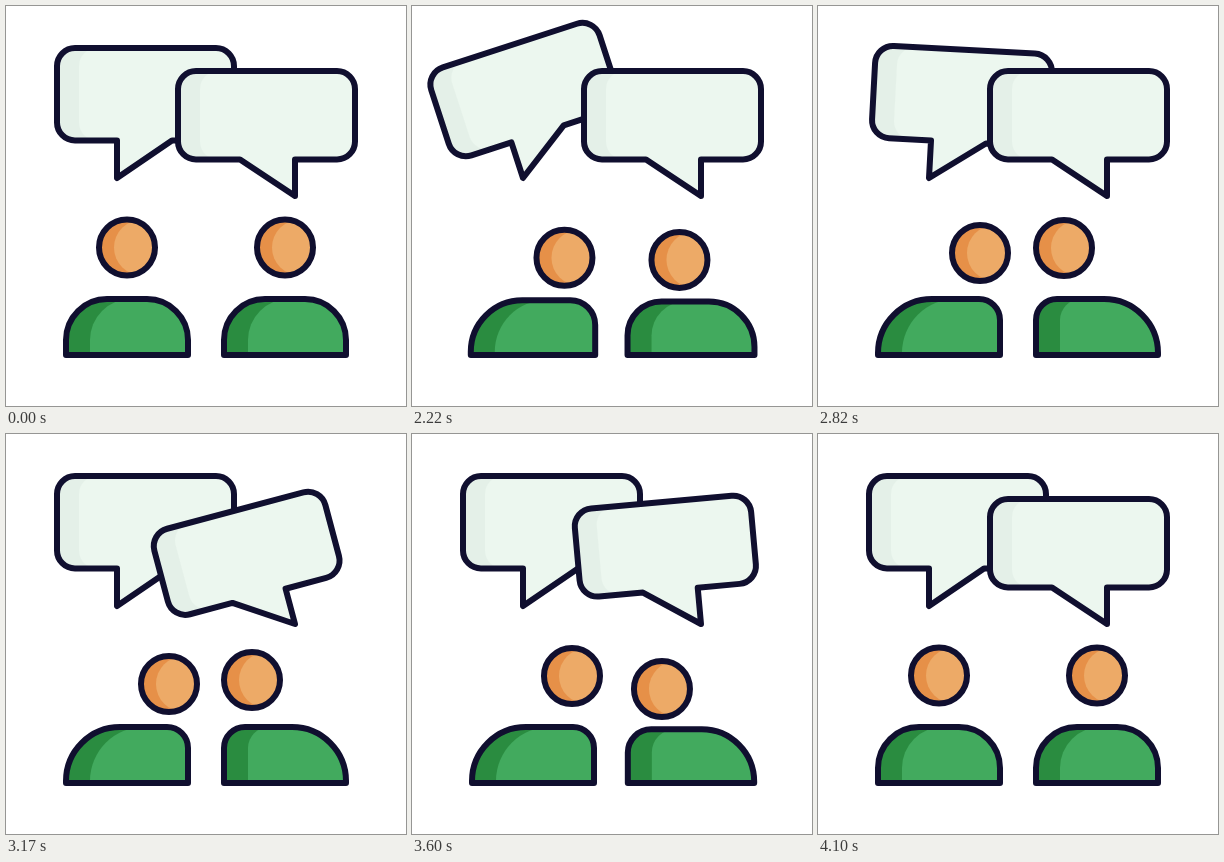
Animation, 400 px wide and 400 px high, one loop 4.12 s. Source, as an HTML page with a canvas:

```html
<!DOCTYPE html>
<html lang="en">
<head>
<meta charset="utf-8">
<title>Conversation</title>
<style>
html, body { margin: 0; width: 100%; height: 100%; overflow: hidden; background: #fff; }
canvas { display: block; }
</style>
</head>
<body>
<canvas id="stage" width="400" height="400"></canvas>
<script>
const ctx = document.getElementById('stage').getContext('2d');
const LOOP = 4120, START = 2020;
const INK = '#100f2f';
const PAPER = ['#e4f0e8', '#ecf7ef'], SKIN = ['#e69048', '#edaa67'], SHIRT = ['#2a8c40', '#42aa5e'];

// Keys are [time, value, ...]; each value eases into the next one.
function at(keys, t, i = 1) {
  const n = keys.findIndex(k => k[0] > t);
  if (n < 0) return keys[keys.length - 1][i];
  if (n === 0) return keys[0][i];
  const a = keys[n - 1], b = keys[n];
  const p = (1 - Math.cos(Math.PI * (t - a[0]) / (b[0] - a[0]))) / 2;
  return a[i] + (b[i] - a[i]) * p;
}

// A damped swing around the tip of a bubble's tail, in degrees.
const swing = (start, step) => [0, -21, 14.8, -9, 3.4, 0].map((v, i) => [start + i * step, v]);

const bubbles = [
  { x: 51, y: 42, h: 92.5, tip: [111, 172], tail: [111, 166], turn: swing(1985, 199) },
  { x: 172, y: 65, h: 88.5, tip: [289, 190], tail: [234, 289], turn: swing(3040, 205) }
];

// head: time, x, y; squash: time, amount
const people = [
  {
    x: 60, lean: 1, reach: 39,
    headX: [[1960, 121], [2340, 161.5], [2820, 162], [3170, 163], [3540, 160.5], [3600, 160], [4000, 121]],
    headY: [[1970, 241.5], [2160, 253], [2380, 246], [2820, 247], [3170, 250], [3600, 242], [3780, 253], [4020, 241.5]],
    squash: [[2040, 0], [2160, 2], [2300, 0], [3640, 0], [3770, 2], [3920, 0]]
  },
  {
    x: 218, lean: -1, reach: 33,
    headX: [[2080, 279], [2430, 246], [3520, 246], [3880, 279]],
    headY: [[2070, 241.5], [2230, 254], [2430, 242], [3050, 242], [3200, 246.5], [3400, 246], [3610, 255], [3890, 241.5]],
    squash: [[2100, 0], [2230, 2.5], [2380, 0], [3480, 0], [3610, 2.2], [3800, 0]]
  }
];

// Fills a path in shade, lays the light part over it, then outlines it.
function shape(path, [shade, light], lightPart) {
  ctx.save();
  ctx.clip(path);
  ctx.fillStyle = shade;
  ctx.fill(path);
  ctx.fillStyle = light;
  ctx.fill(lightPart);
  ctx.restore();
  ctx.stroke(path);
}

function drawBubble({ x, y, h, tip, tail, turn }, t) {
  const w = 177, r = 18, right = x + w, bottom = y + h;
  const path = new Path2D();
  path.moveTo(x + r, y);
  path.arcTo(right, y, right, bottom, r);
  path.arcTo(right, bottom, x, bottom, r);
  path.lineTo(tail[1], bottom);
  path.lineTo(...tip);
  path.lineTo(tail[0], bottom);
  path.arcTo(x, bottom, x, y, r);
  path.arcTo(x, y, right, y, r);
  path.closePath();
  const light = new Path2D();
  light.roundRect(x + 22, y, w, h, r);
  light.rect(x + 50, bottom - 1, w, 50);

  ctx.save();
  ctx.translate(...tip);
  ctx.rotate(at(turn, t) * Math.PI / 180);
  ctx.translate(-tip[0], -tip[1]);
  shape(path, PAPER, light);
  ctx.restore();
}

function bodyPath(left, right, top, rl, rr) {
  const base = 349, path = new Path2D();
  path.moveTo(left, base);
  path.arcTo(left, top, right, top, rl);
  path.arcTo(right, top, right, base, rr);
  path.lineTo(right, base);
  path.closePath();
  return path;
}

function circle(x, y) {
  const path = new Path2D();
  path.arc(x, y, 28, 0, 2 * Math.PI);
  return path;
}

function drawPerson({ x, lean, reach, headX, headY, squash }, t) {
  const hx = at(headX, t), hy = at(headY, t), s = at(squash, t);
  const k = Math.min(1, Math.abs(hx - headX[0][1]) / reach);
  const back = 41 + 13 * k, front = 41 - 20 * k;
  const [rl, rr] = lean > 0 ? [back, front] : [front, back];
  const left = x - s, right = x + 122 + s, top = 293 + s;
  shape(bodyPath(left, right, top, rl, rr), SHIRT, bodyPath(left + 24, right + 60, top, rl, 1));
  shape(circle(hx, hy), SKIN, circle(hx + 15, hy));
}

function draw() {
  const now = performance.now() % LOOP;
  const t = now < START ? 0 : now;
  ctx.fillStyle = '#fff';
  ctx.fillRect(0, 0, 400, 400);
  ctx.strokeStyle = INK;
  ctx.lineWidth = 6;
  ctx.lineJoin = 'round';
  bubbles.forEach(b => drawBubble(b, t));
  people.forEach(p => drawPerson(p, t));
  requestAnimationFrame(draw);
}
draw();
</script>
</body>
</html>
```
